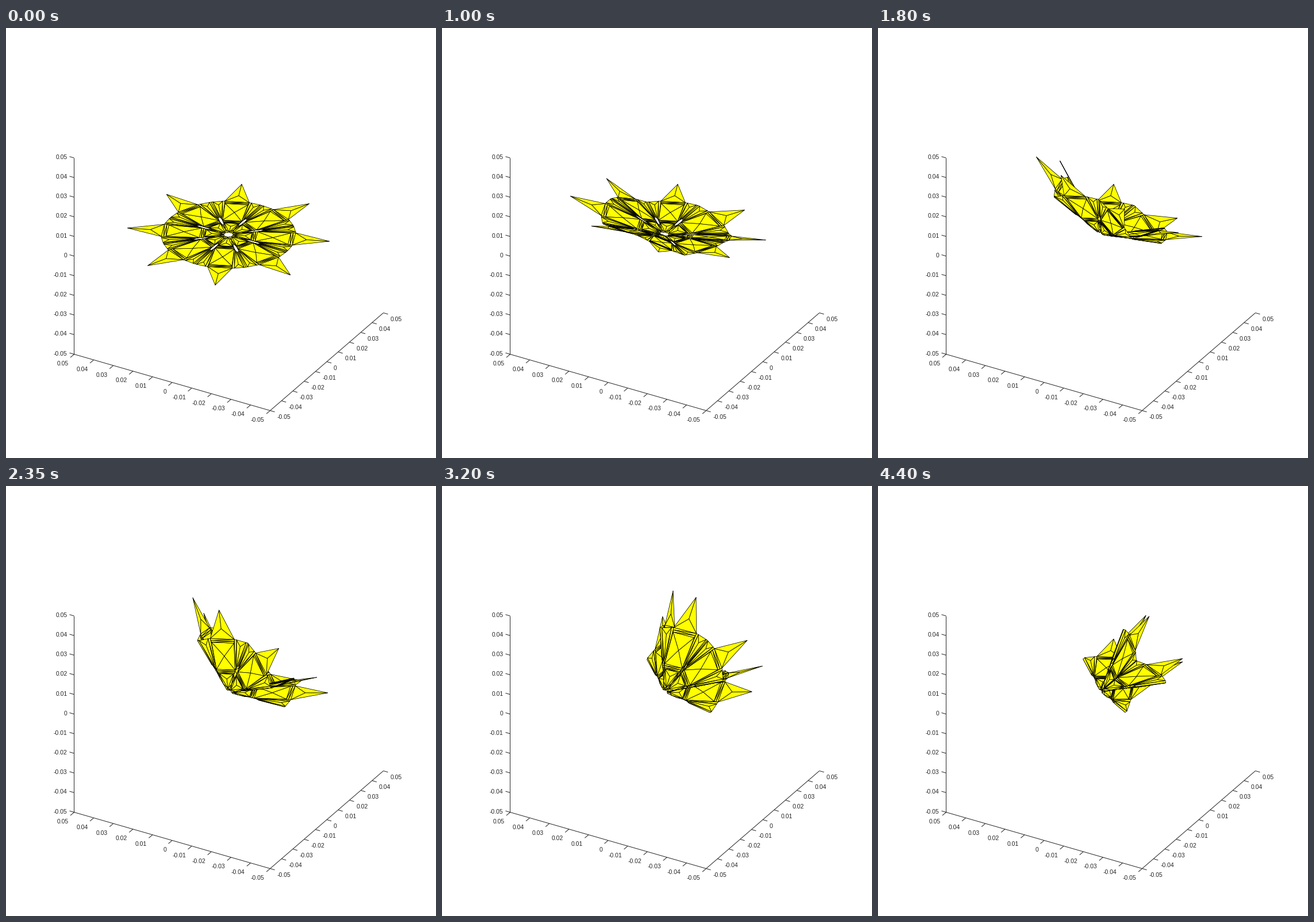
Write a matplotlib script that moves like this. It is 748 by 748 pixels and loops after 4500 ms.

```python
import numpy as np
import matplotlib.pyplot as plt
from matplotlib.animation import FuncAnimation
from matplotlib.collections import LineCollection, PolyCollection

SIZE, DPI = 748, 100
PX = 72 / DPI
STEPS, HOLD, FRAMES = 79, 10, 90
HALF = np.radians(22.5)
RIM, TIP = 117, 177
THICK = 2.3
ORIGIN = np.array([387, 359.5])
SIN_EL, COS_EL = 0.5, np.sqrt(0.75)
TO_VIEWER = np.array([0, -COS_EL, SIN_EL])
INK = "#262626"
EPS = 1e-6


def rim(deg):
    a = np.radians(deg)
    return RIM * np.cos(a), RIM * np.sin(a)


def crease(r, inset=0.0):
    c, s = np.cos(HALF), np.sin(HALF)
    return r * c + inset * s, r * s - inset * c


def fan(node, *corners):
    """Triangles from an inner node to every side of a polygon."""
    return [(node, p, q) for p, q in zip(corners, corners[1:] + corners[:1])]


def band(p, q):
    """Mirrored strip between two half-widths, split by a diagonal."""
    (a, b), (c, d) = p, q
    return [((a, -b), (a, b), (c, d)), ((a, -b), (c, d), (c, -d))]


def half_mesh():
    inner, outer, corner, apex = (49, 16.5), (107, 20), (115, 21.5), (54, 19.3)
    neck, base, hub = (42, 14.5), (40, 12.5), (9, 0)
    slit_in, slit_out = crease(32), crease(63)
    slit_side = crease(62, 1.2)
    polys = [
        (inner, outer, corner), (inner, corner, rim(12.6)), (inner, rim(12.6), apex),
        (apex, rim(21), slit_side), (slit_side, rim(21), rim(22.5), slit_out),
        (inner, apex, neck), (neck, slit_in, base),
        (base, slit_in, crease(19)), (base, crease(19), hub),
        (hub, crease(19), crease(7.5)),
    ]
    return polys + fan((100, 30.5), apex, rim(12.6), rim(21))


def sector_mesh():
    polys = half_mesh()
    polys += [tuple((a, -b) for a, b in p) for p in polys]
    polys += fan((137, 0), (115, -21.5), (115, 21.5), (TIP, 0))
    polys += fan((78, 0), (49, -16.5), (107, -20), (107, 20), (49, 16.5))
    polys += fan((29, 0), (40, -12.5), (40, 12.5), (9, 0))
    rows = [(115, 21.5), (110.8, 20.7), (107, 20)]
    rows_in = [(49, 16.5), (45.5, 15.5), (42, 14.5), (40, 12.5)]
    for line in (rows, rows_in):
        for p, q in zip(line, line[1:]):
            polys += band(p, q)
    return polys


MESH = sector_mesh()
CUTS = np.cumsum([len(p) for p in MESH])[:-1]
FLAT = np.array([v for p in MESH for v in p], float)
# Panels stand apart by their thickness; the crease lines stay shared.
INSET = FLAT[:, 0] * np.sin(HALF) - np.abs(FLAT[:, 1]) * np.cos(HALF)
LIFT = np.clip(INSET / 1.2, 0, 1)[:, None]


def unit(v):
    return v / np.linalg.norm(v)


def polar(deg, tilt):
    a = np.radians(deg)
    return np.array([np.sin(tilt) * np.cos(a), np.sin(tilt) * np.sin(a), np.cos(tilt)])


def fold(delta):
    """Mountain, valley and normal of all eight sectors, the first kept level."""
    alpha = np.pi / 2 - delta / 2
    c, d = np.cos(alpha), np.sin(alpha) * np.sqrt(0.5)
    beta = np.arctan2(d, c) + np.arccos(min(1, np.sqrt(0.5) / np.hypot(c, d)))
    sectors = []
    for j in range(4):
        for side in (1, -1):
            az = 60 + 90 * j
            m, v = polar(az, alpha), polar(az + 45 * side, beta)
            sectors.append((m, v, side * unit(np.cross(m, v))))
    m, _, n = sectors[0]
    src = np.array([m, np.cross(n, m), n])
    e, up = polar(60, np.pi / 2), np.array([0, 0, 1])
    turn = src.T @ np.array([e, np.cross(up, e), up])
    return [np.array(s) @ turn for s in sectors]


def covers(p, q):
    """True if sector p lies in front of sector q."""
    def side(x, y):
        return x[:2] @ (y[2] * np.sign(y[2] @ TO_VIEWER))
    s = side(p, q)
    if s.min() > -EPS:
        return s.max() > EPS
    if s.max() < EPS:
        return False
    return side(q, p).max() < EPS


def back_to_front(sectors):
    left = sorted(sectors, key=lambda s: (s[0] + s[1]) @ TO_VIEWER)
    order = []
    while left:
        free = (i for i, s in enumerate(left)
                if not any(covers(s, q) for q in left if q is not s))
        order.append(left.pop(next(free, 0)))
    return order


def shape(step):
    # The fold slows down a little as it closes.
    delta = np.radians(2.47 * step - 0.0027 * step ** 2)
    gap = THICK * (1 - np.cos(delta / 2))
    polys = []
    for m, v, n in back_to_front(fold(delta)):
        pts = FLAT @ np.array([unit(m + v), unit(v - m)]) - LIFT * gap * n
        pts[:, 2] += gap
        y = -pts[:, 1] * SIN_EL - pts[:, 2] * COS_EL
        polys += np.split(ORIGIN + np.column_stack([pts[:, 0], y]), CUTS)
    return polys


fig = plt.figure(figsize=(SIZE / DPI, SIZE / DPI), dpi=DPI, facecolor="white")
ax = fig.add_axes([0, 0, 1, 1])
ax.set_xlim(0, SIZE)
ax.set_ylim(SIZE, 0)
ax.axis("off")


def draw_axis(start, end, tick, shift, align):
    """Axis whose labels run from 0.05 at the start to -0.05 at the end."""
    start, end = np.array(start), np.array(end)
    lines = [(start, end)]
    for i in range(11):
        p = start + (end - start) * i / 10
        lines.append((p, p + tick))
        label = "0" if i == 5 else f"{(5 - i) / 100:.2f}"
        ax.text(*(p + shift), label, ha=align, va="center_baseline",
                family="Liberation Sans", size=10.4 * PX, color=INK)
    ax.add_collection(LineCollection(lines, colors=INK, linewidths=PX))


draw_axis((118.5, 226), (118.5, 567.5), (-8, -2.3), (-12, -2), "right")
draw_axis((118.5, 567.5), (459.5, 665.5), (-6.5, 5.6), (-10, 15.5), "right")
draw_axis((656.5, 495.5), (459.5, 665.5), (8, 2.3), (12, 10.8), "left")

star = PolyCollection(shape(0), facecolors="#ffff00", edgecolors="black",
                      linewidths=0.75 * PX, joinstyle="round", zorder=5)
ax.add_collection(star)


def update(i):
    star.set_verts(shape(min(max(i - HOLD + 1, 0), STEPS)))
    return [star]


anim = FuncAnimation(fig, update, frames=FRAMES, interval=50, repeat=True,
                     repeat_delay=0)
plt.show()
```
